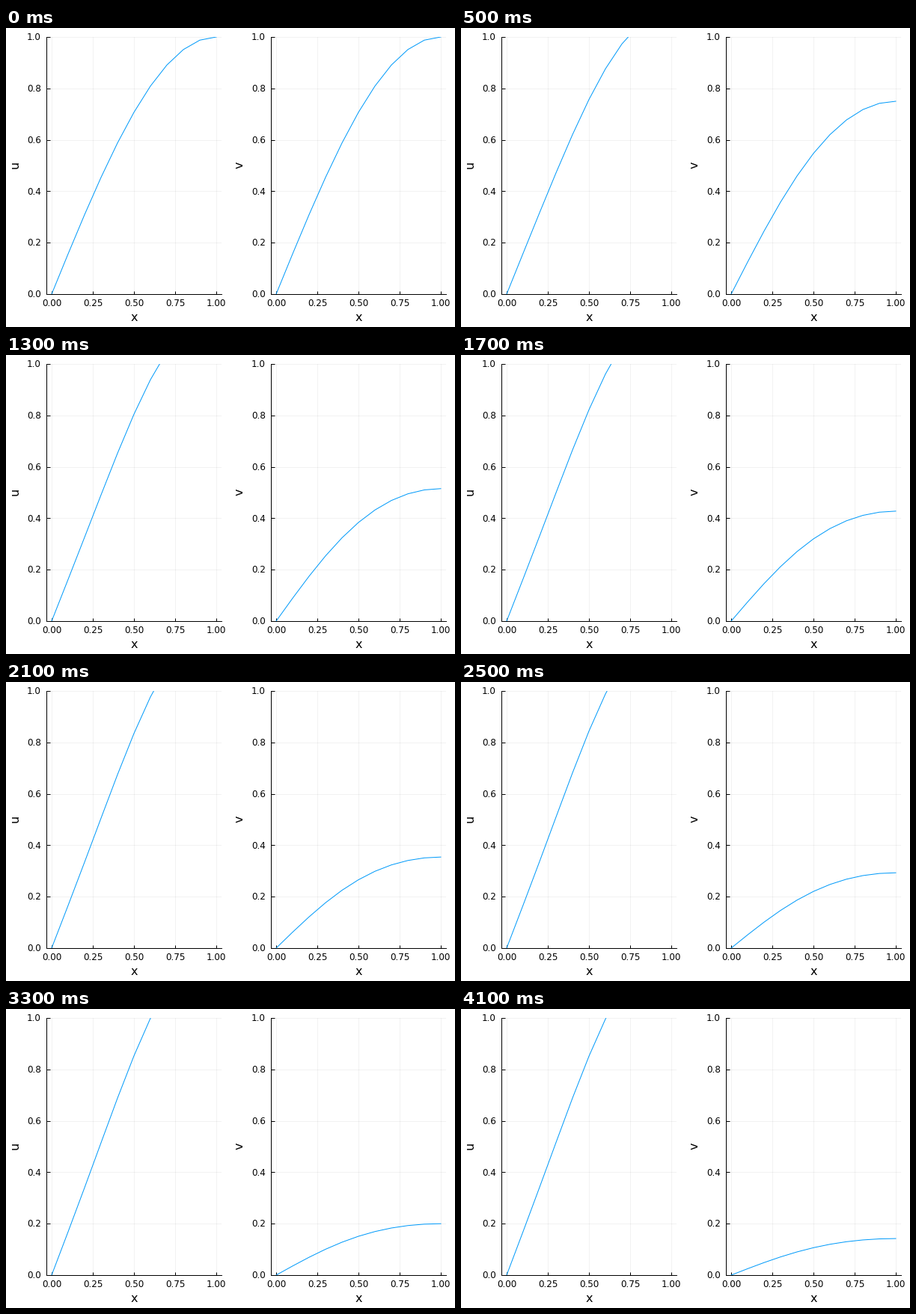
These frames come from a looping animation (600 px wide and 400 px high, 4200 ms). A matplotlib script:

```python
import numpy as np
import matplotlib.pyplot as plt
from matplotlib.animation import FuncAnimation

W, H, DPI = 600, 400, 100
FRAMES, INTERVAL = 42, 100
TOP, BOTTOM = 12, 356
X0, X_SPAN, PAD = 61, 220, 0.03
PX = 72 / DPI  # points per pixel

plt.rcParams["font.family"] = "DejaVu Sans"

# Amplitudes over time: a sine mode plus a bend that straightens or flattens it
KEYS = np.array([0, 5, 9, 17, 25, 33, 41])
U_SINE = [1, 1.0906, 1.1375, 1.2028, 1.239, 1.2525, 1.2475]
U_BEND = [0, -0.020, -0.030, -0.040, -0.045, -0.046, -0.043]
V_SINE = [1, 0.762, 0.635, 0.440, 0.3024, 0.2068, 0.1465]
V_BEND = [0, 0.012, 0.014, 0.0123, 0.0094, 0.0068, 0.0043]


def smooth(values):
    """Cubic Hermite curve through the key values, at every frame."""
    values = np.array(values, float)
    slope = np.gradient(values, KEYS, edge_order=2)
    t = np.arange(FRAMES)
    i = np.clip(np.searchsorted(KEYS, t, side="right") - 1, 0, len(KEYS) - 2)
    h = KEYS[i + 1] - KEYS[i]
    s = (t - KEYS[i]) / h
    return ((1 + 2 * s) * (1 - s) ** 2 * values[i]
            + s * (1 - s) ** 2 * h * slope[i]
            + s ** 2 * (3 - 2 * s) * values[i + 1]
            + s ** 2 * (s - 1) * h * slope[i + 1])


def mode(n):
    return np.sin(n * np.pi * x / 2)


x = np.linspace(0, 1, 11)
u_bend = 0.25 * mode(1) + 0.94 * mode(3) + 0.18 * mode(5)
u = np.outer(smooth(U_SINE), mode(1)) + np.outer(smooth(U_BEND), u_bend)
v = (np.outer(np.exp(smooth(np.log(V_SINE))), mode(1))
     + np.outer(smooth(V_BEND), mode(3)))

fig = plt.figure(figsize=(W / DPI, H / DPI), dpi=DPI, facecolor="white")


def label(px, py, text, size, **kw):
    fig.text(px / W, 1 - py / H, text, fontsize=size * PX, color="black", **kw)


def panel(shift, name):
    left = X0 + shift - PAD * X_SPAN
    width = X_SPAN * (1 + 2 * PAD)
    ax = fig.add_axes([left / W, 1 - BOTTOM / H, width / W, (BOTTOM - TOP) / H])
    ax.set(xlim=(-PAD, 1 + PAD), ylim=(0, 1))
    xticks, yticks = np.linspace(0, 1, 5), np.linspace(0, 1, 6)
    ax.set_xticks(xticks)
    ax.set_yticks(yticks)
    ax.tick_params(direction="in", length=4.5 * PX, width=PX,
                   labelbottom=False, labelleft=False)
    ax.grid(color="black", alpha=0.07, linewidth=0.5)
    ax.set_axisbelow(True)
    ax.spines[["top", "right"]].set_visible(False)
    ax.spines[["left", "bottom"]].set_linewidth(PX)

    for t in xticks:
        label(X0 + shift + t * X_SPAN, 371.5, f"{t:.2f}", 12, ha="center", va="baseline")
    for t in yticks:
        y = BOTTOM - t * (BOTTOM - TOP)
        label(47 + shift, y + 4.2, f"{t:.1f}", 12, ha="right", va="baseline")
    label(171.5 + shift, 391.5, "x", 16, ha="center", va="baseline")
    label(19.2 + shift, 182.8, name, 16, ha="right", va="center", rotation=90)
    return ax.plot([], [], color="#009AFA", linewidth=PX)[0]


u_line, v_line = panel(0, "u"), panel(300, "v")


def update(frame):
    u_line.set_data(x, u[frame])
    v_line.set_data(x, v[frame])
    return u_line, v_line


anim = FuncAnimation(fig, update, frames=FRAMES, interval=INTERVAL,
                     repeat=True, repeat_delay=0, blit=False)
plt.show()
```
